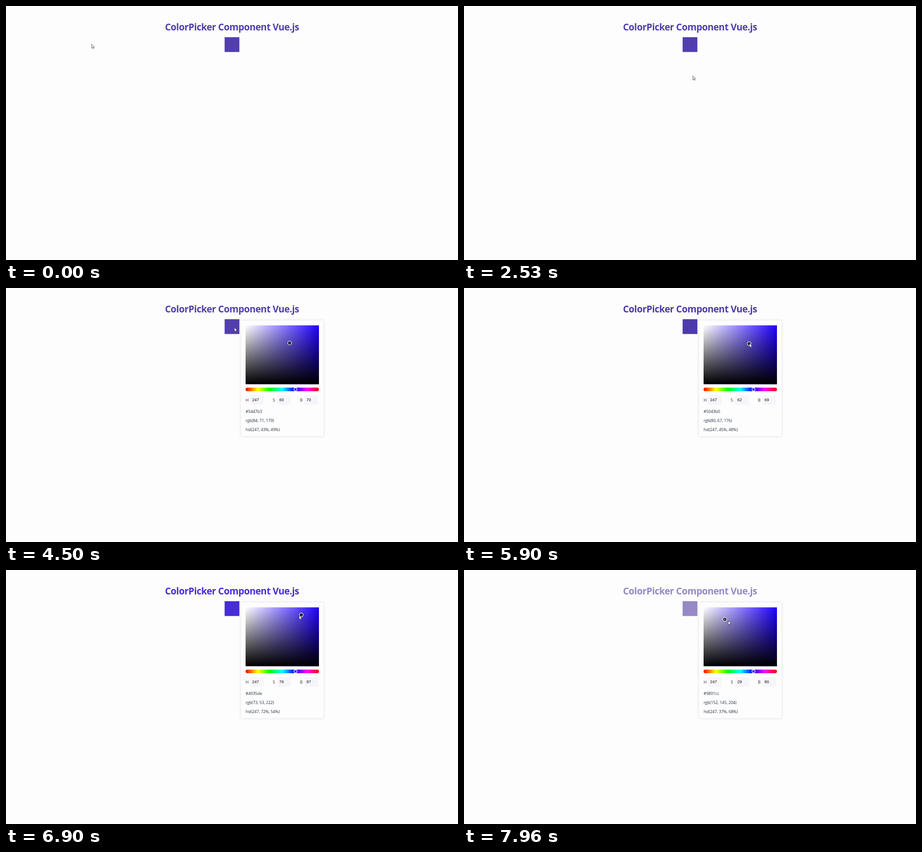
Animation of 998x561 px, one loop 8000 ms. Source, as an HTML page:

```html
<!DOCTYPE html>
<html lang="en">
<head>
<meta charset="utf-8">
<title>ColorPicker</title>
<style>
  html, body { margin: 0; width: 100%; height: 100%; overflow: hidden; background: #fdfdfd; }
  svg { position: absolute; left: 0; top: 0; }
  #title { font: 700 20.6px "Open Sans", "Noto Sans", sans-serif; letter-spacing: -.5px; }
  #panel text { font: 9px "Open Sans", "Noto Sans", sans-serif; letter-spacing: -.12px; fill: #263240; }
  #panel .value { font: 9px "Liberation Sans", Arial, sans-serif; letter-spacing: 0; fill: #111; }
  .card { fill: #fdfdfd; filter: drop-shadow(0 0 2px rgba(60, 60, 110, .2)); }
  .field rect { fill: #f6f6fa; }
</style>
</head>
<body>
<svg width="998" height="561" viewBox="0 0 998 561">
  <defs>
    <linearGradient id="saturation">
      <stop stop-color="#fff"/><stop offset="1" stop-color="#1e00ff"/>
    </linearGradient>
    <linearGradient id="brightness" x2="0" y2="1">
      <stop stop-color="#000" stop-opacity="0"/><stop offset="1"/>
    </linearGradient>
    <linearGradient id="hues"></linearGradient>
  </defs>

  <g id="accent">
    <text id="title" x="499" y="53.5" text-anchor="middle">ColorPicker Component Vue.js</text>
    <rect x="482.7" y="68.9" width="32.6" height="32.7"/>
  </g>

  <g id="panel">
    <rect class="card" x="518.5" y="71.5" width="183" height="256" rx="3"/>
    <g transform="translate(529 82.5)">
      <rect width="162" height="130" fill="url(#saturation)"/>
      <rect width="162" height="130" fill="url(#brightness)"/>
      <g id="handle">
        <circle r="4.7" fill="#fff"/>
        <circle r="3.4"/>
        <circle id="core" r="1.8"/>
      </g>
    </g>
    <rect x="529" y="220" width="162" height="8" rx="4" fill="url(#hues)"/>
    <circle cx="639.2" cy="224" r="3.4" fill="#1e00ff" stroke="#fff" stroke-width="1.4"/>
    <g id="fields"></g>
    <text id="hex" x="529" y="276"></text>
    <text id="rgb" x="529" y="296"></text>
    <text id="hsl" x="529" y="315.5"></text>
  </g>

  <path id="cursor" d="M.3.3V9.2L2.3 7.3 3.7 10.4 5 9.8 3.7 6.8H6.5Z" fill="#fff" stroke="#2a2a32" stroke-width=".75"/>
</svg>

<script>
  const LOOP = 8000, OPEN_AT = 3750, GRAB_AT = 5870, LAG = 40, HUE = 247;
  const AREA = { x: 529, y: 82.5, w: 162, h: 130 };

  // Turning points of the mouse
  const path = [
    { t: 0, x: 189, y: 84 },
    { t: 900, x: 845, y: 190 },
    { t: 1460, x: 887, y: 134 },
    { t: 2530, x: 505, y: 154 },
    { t: 2850, x: 570, y: 122 },
    { t: 3450, x: 504, y: 87 },
    { t: 4500, x: 504, y: 87 },
    { t: 5150, x: 657, y: 128 },
    { t: 5850, x: 629.5, y: 123 },
    { t: 6620, x: 670, y: 96 },
    { t: 7230, x: 618, y: 105 },
    { t: 7530, x: 668, y: 98 },
    { t: 7870, x: 570, y: 105.5 },
    { t: LOOP, x: 587, y: 114 }
  ];

  const $ = id => document.getElementById(id);
  const place = (id, x, y) => $(id).setAttribute("transform", `translate(${x} ${y})`);
  const write = (id, text) => { $(id).textContent = text; };
  const percent = value => Math.round(value * 100);

  function build() {
    for (let i = 0; i <= 6; i++) {
      $("hues").innerHTML += `<stop offset="${i / 6}" stop-color="hsl(${i * 60}, 100%, 50%)"/>`;
    }
    $("fields").innerHTML = [..."HSB"].map((name, i) =>
      `<g class="field" transform="translate(${529 + i * 60} 237)">
        <rect x="10" width="30" height="21" rx="2"/>
        <text y="14">${name}</text>
        <text class="value" id="${name}" x="14.5" y="13"></text>
      </g>`).join("");
    write("H", HUE);
  }

  const slope = (i, axis) => (path[i + 1][axis] - path[i][axis]) / (path[i + 1].t - path[i].t);

  // Monotone tangent: flat at turning points, so the path never overshoots
  function tangent(i, axis) {
    if (i === 0 || i === path.length - 1) return 0;
    const a = slope(i - 1, axis), b = slope(i, axis);
    return a * b > 0 ? 2 * a * b / (a + b) : 0;
  }

  function mouseAt(time) {
    const i = path.findIndex(p => p.t > time) - 1;
    const from = path[i], to = path[i + 1];
    const span = to.t - from.t, u = (time - from.t) / span;
    return ["x", "y"].map(axis =>
      from[axis] + (to[axis] - from[axis]) * u * u * (3 - 2 * u)
        + span * u * (1 - u) * ((1 - u) * tangent(i, axis) - u * tangent(i + 1, axis)));
  }

  function pickAt(time) {
    if (time < GRAB_AT) return { s: .6, v: .7 };
    const [x, y] = mouseAt(time - LAG);
    return { s: (x - AREA.x) / AREA.w, v: 1 - (y - AREA.y) / AREA.h };
  }

  function toRgb(s, v) {
    return [5, 3, 1].map(n => {
      const k = (n + HUE / 60) % 6;
      return Math.round(255 * v * (1 - s * Math.max(0, Math.min(k, 4 - k, 1))));
    });
  }

  function toHsl(s, v) {
    const l = v * (1 - s / 2);
    return `hsl(${HUE}, ${percent((v - l) / Math.min(l, 1 - l))}%, ${percent(l)}%)`;
  }

  function draw(time) {
    const { s, v } = pickAt(time);
    const sat = percent(s), bri = percent(v);
    const rgb = toRgb(sat / 100, bri / 100);
    const [r, g, b] = rgb;
    const shade = `rgb(${r - 2}, ${g - 8}, ${b - 6})`;

    place("cursor", ...mouseAt(time).map(Math.round));
    place("handle", s * AREA.w, (1 - v) * AREA.h);
    $("accent").setAttribute("fill", shade);
    $("core").setAttribute("fill", shade);
    $("panel").style.display = time < OPEN_AT ? "none" : "";
    write("S", sat);
    write("B", bri);
    write("hex", "#" + rgb.map(c => c.toString(16).padStart(2, "0")).join(""));
    write("rgb", `rgb(${rgb.join(", ")})`);
    write("hsl", toHsl(sat / 100, bri / 100));
  }

  build();
  const start = performance.now();
  function tick() {
    draw((performance.now() - start) % LOOP);
    requestAnimationFrame(tick);
  }
  tick();
</script>
</body>
</html>
```
